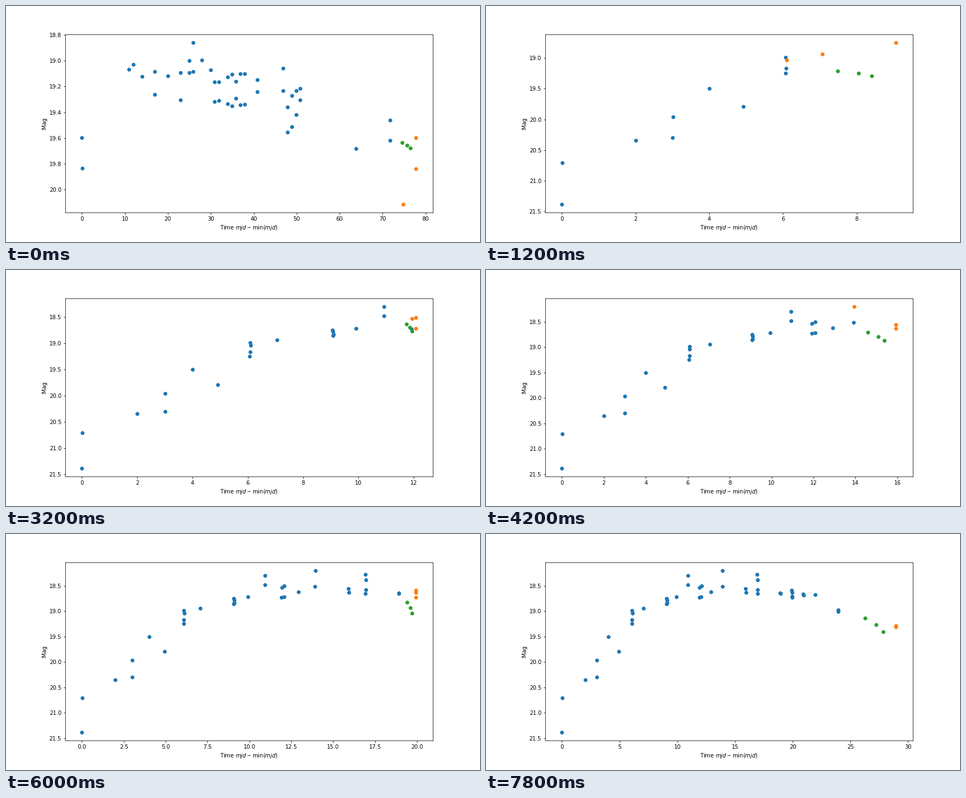
Animation, 864 px wide and 432 px high, one loop 8 s. Source, as a matplotlib script:

```python
import numpy as np
import matplotlib.pyplot as plt
from matplotlib.animation import FuncAnimation

FRAMES, STEP_MS = 40, 200
AHEAD = 3                                  # points still to come
START = 4                                  # known points before the first step
FAN = np.array([-1, 1, -0.4, 0.6])         # scatter of exposures in one night
REACH = np.array([0.47, 0.66, 0.78])       # forecast times, as part of the way

rng = np.random.default_rng(4)


def light_curve(nights, counts, mid, spread):
    """Fan the exposures of each night around its middle magnitude."""
    order = np.concatenate([np.arange(c) for c in counts])
    t = np.repeat(nights, counts) + 0.01 * order
    m = np.repeat(mid, counts) + np.repeat(spread, counts) * FAN[order]
    return np.array([t, m])


def keyed(t, *points):
    return np.interp(t, *zip(*points))


def fading_curve():
    day = np.r_[0, 11, 12, 14:24:3, 25, 26, 28, 30:33, 34:39, 41, 47:52,
                64, 72, 75, 78]
    counts = np.where(np.isin(day, [11, 12, 14, 20, 28, 30, 64, 75]), 1, 2)
    mid = keyed(day, (0, 19.65), (11, 19.1), (23, 19.15), (26, 18.93),
                (31, 19.19), (38, 19.17), (47, 19.1), (48, 19.4), (51, 19.21),
                (64, 19.69), (72, 19.48), (75, 20.11), (78, 19.65))
    spread = rng.uniform(0.03, 0.12, len(day))
    t, m = light_curve(0.997 * day, counts, mid, spread)
    return np.array([t, np.interp(m, (m.min(), m.max()), (18.859, 20.113))])


def rising_curve():
    day = np.r_[0, 2:8, 9:13, 12.15, 13, 14, 16, 17, 19:23, 24, 29]
    counts = [2, 1, 2, 1, 1, 4, 1, 4, 1, 2, 2, 2, 1, 2, 2, 4, 2, 4, 2, 1, 2, 3]
    drift = np.where((day > 5) & (day < 10), 0.065, -0.08 * (day > 4))
    mid = keyed(day, (0, 21.047), (2, 20.12), (3, 20.13), (4, 19.34),
                (5, 19.65), (6, 19.115), (7, 18.87), (9, 18.8), (10, 18.79),
                (11, 18.39), (12, 18.63), (14, 18.356), (16, 18.59),
                (17, 18.46), (19, 18.645), (22, 18.69), (24, 18.99),
                (29, 19.295))
    spread = keyed(day, (0, -0.338), (3, -0.17), (6, -0.13), (9, 0.055),
                   (11, 0.092), (12, -0.1), (14, -0.16), (16, 0.04),
                   (17, 0.19), (19, 0.005), (20, 0.07), (21, 0.012),
                   (29, 0.014))
    return light_curve(day + drift, counts, mid, spread)


fading, rising = fading_curve(), rising_curve()


def forecast(curve, n, step):
    """Continue from the last known points, fading faster in later steps."""
    t, m = curve
    base = t[n - 2:n].mean()
    times = base + REACH * (t[n + AHEAD - 1] - base)
    drop = 0.05 + 0.005 * step + (0.02 + 0.003 * step) * np.arange(AHEAD)
    return times, m[n - 3:n].mean() + drop


plt.rcParams.update({"font.family": "DejaVu Sans", "font.size": 10,
                     "text.kerning_factor": 6})
fig = plt.figure(figsize=(12, 6), dpi=72, facecolor="white")
ax = fig.add_axes([0.125, 0.125, 0.775, 0.755])


def draw(step):
    if step == 0:
        curve, n = fading, fading.shape[1] - AHEAD
    else:
        curve, n = rising, START + step
    ax.clear()
    ax.plot(*curve[:, :n], "o", color="C0")
    ax.plot(*curve[:, n:n + AHEAD], "o", color="C1")
    ax.plot(*forecast(curve, n, step), "o", color="C2")
    ax.invert_yaxis()
    ax.set_xlabel(r"Time $mjd - \min(mjd)$")
    ax.set_ylabel("Mag")
    return ax.get_children()


anim = FuncAnimation(fig, draw, frames=FRAMES, interval=STEP_MS,
                     init_func=lambda: draw(0), repeat=True, repeat_delay=0)
plt.show()
```
